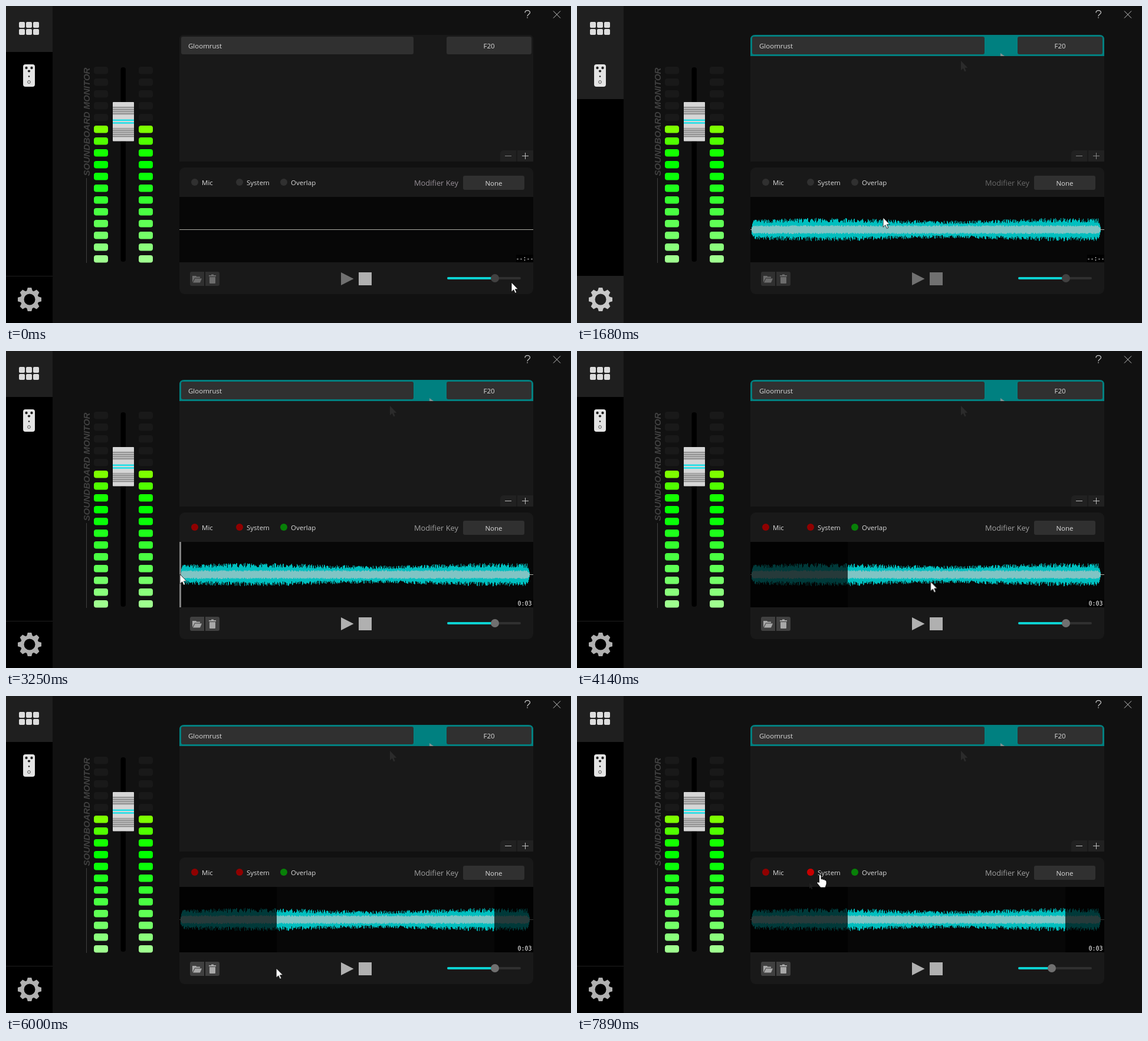
These frames come from a looping animation (958x538 px, 8 s). An HTML page:

```html
<!DOCTYPE html>
<html lang="en">
<head>
<meta charset="utf-8">
<title>Soundboard</title>
<style>
html, body { margin: 0; width: 100%; height: 100%; overflow: hidden; background: #111; }
svg { display: block; width: 958px; height: 538px; animation: state 8s step-end infinite; }
text { font: 11.5px "Open Sans", "Noto Sans", sans-serif; fill: #dcdcdc; }
.mid { text-anchor: middle; }
.vertical { font: italic bold 15px "Liberation Sans", Arial, sans-serif; fill: #404040; }
.time { font: 10px "DejaVu Sans Mono", monospace; fill: #fff; }
.panel { fill: #191919; }
.field { fill: #303030; }
.line { fill: none; stroke-width: 1; }

/* Three states of the window: nothing selected, busy, clip loaded */
@keyframes state {
  0% {
    --top: #1f1f1f; --side: #000; --gear: #b0b0b0; --row: #191919; --plus: #c0c0c0; --minus: #858585;
    --key: #978f97; --btn: #303030; --icon: #6c6c6c; --play: #707070; --stop: #b0b0b0;
    --knob: #414141; --rec: #303030; --sys: #303030; --mix: #303030;
  }
  8.5% {
    --top: #202020; --side: #202020; --gear: #c8c8c8; --row: #008080; --plus: #858585; --minus: #858585;
    --key: #686868; --btn: #303030; --icon: #6c6c6c; --play: #707070; --stop: #707070;
    --knob: #414141; --rec: #303030; --sys: #303030; --mix: #303030;
  }
  21.375%, 100% {
    --top: #1f1f1f; --side: #000; --gear: #b0b0b0; --row: #008080; --plus: #c0c0c0; --minus: #c0c0c0;
    --key: #a0a0a0; --btn: #404040; --icon: #a8a8a8; --play: #b0b0b0; --stop: #b0b0b0;
    --knob: #707070; --rec: #900000; --sys: #900000; --mix: #088008;
  }
}

#cursor { animation: move 8s linear infinite; }
@keyframes move {
  0%, .375% { transform: translate(857px, 469px); }
  2.5% { transform: translate(760px, 378px); }
  5.25% { transform: translate(651px, 93px); }
  7.25% { transform: translate(732px, 50px); }
  9.75%, 11% { transform: translate(714px, 72px); }
  11.75% { transform: translate(705px, 105px); }
  15% { transform: translate(640px, 225px); }
  18.5% { transform: translate(545px, 340px); }
  21% { transform: translate(519px, 359px); }
  23%, 24.75% { transform: translate(523px, 362px); }
  27.5% { transform: translate(470px, 435px); }
  30.5% { transform: translate(350px, 451px); }
  33% { transform: translate(281px, 400px); }
  34.375%, 35.25% { transform: translate(291px, 382px); }
  37.75%, 40.25% { transform: translate(297px, 380px); }
  40.625%, 43.125% { transform: translate(295px, 379px); }
  46.125%, 48.625% { transform: translate(460px, 384px); }
  52% { transform: translate(610px, 392px); }
  56% { transform: translate(860px, 390px); }
  57.875%, 58.75% { transform: translate(892px, 386px); }
  61% { transform: translate(828px, 390px); }
  64% { transform: translate(719px, 444px); }
  66.25% { transform: translate(630px, 519px); }
  68.625%, 70% { transform: translate(468px, 488px); }
  73% { transform: translate(588px, 466px); }
  77% { transform: translate(330px, 458px); }
  79.875%, 80.25% { transform: translate(418px, 462px); }
  83.5% { transform: translate(740px, 461px); }
  85.25%, 86.125% { transform: translate(816px, 462px); }
  88% { transform: translate(880px, 463px); }
  90%, 90.375% { transform: translate(808px, 463px); }
  91.5% { transform: translate(760px, 471px); }
  94.5% { transform: translate(272px, 345px); }
  96.75% { transform: translate(394px, 316px); }
  98.625%, 100% { transform: translate(412px, 303px); }
}

.step { opacity: 0; animation: 8s step-end infinite; }
#wave { animation-name: wave; }
#trail { animation-name: trail; }
#lastTrail { animation-name: lastTrail; }
#hand, #sysHover { animation-name: hover; }
#arrow { animation-name: arrow; opacity: 1; }
#empty { animation-name: empty; }
#length { animation-name: ready; }
@keyframes wave { 0% { opacity: 0 } 18.75%, 100% { opacity: 1 } }
@keyframes trail { 0% { opacity: 0 } 8.5%, 100% { opacity: 1 } }
@keyframes lastTrail { 0% { opacity: 0 } 97%, 100% { opacity: 1 } }
@keyframes hover { 0% { opacity: 0 } 97.25%, 100% { opacity: 1 } }
@keyframes arrow { 0% { opacity: 1 } 97.25%, 100% { opacity: 0 } }
@keyframes empty { 0% { opacity: 1 } 21.375%, 100% { opacity: 0 } }
@keyframes ready { 0% { opacity: 0 } 21.375%, 100% { opacity: 1 } }

/* Trim handles and the shade outside the trimmed part */
.handle { fill: #808080; opacity: 0; }
#leftHandle { animation: leftShow 8s step-end infinite, leftMove 8s linear infinite; }
#rightHandle { animation: rightShow 8s step-end infinite, rightMove 8s linear infinite; }
#leftShade { animation: leftTrim 8s linear infinite; }
#rightShade { animation: rightTrim 8s linear infinite; transform-origin: 894px 0; }
@keyframes leftShow { 0% { opacity: 0 } 36% { opacity: 1 } 48.75%, 100% { opacity: 0 } }
@keyframes rightShow { 0% { opacity: 0 } 57% { opacity: 1 } 61.5%, 100% { opacity: 0 } }
@keyframes leftMove { 0%, 43.125% { transform: none } 46.125%, 100% { transform: translateX(163px) } }
@keyframes rightMove { 0%, 58.75% { transform: none } 61%, 100% { transform: translateX(-65px) } }
@keyframes leftTrim { 0%, 43.125% { width: 0 } 46.125%, 100% { width: 165px } }
@keyframes rightTrim { 0%, 58.75% { transform: scaleX(0) } 61%, 100% { transform: scaleX(1) } }

#level { animation: level 8s linear infinite; }
#knob { animation: knob 8s linear infinite; }
@keyframes level { 0%, 86.125% { width: 81px } 88% { width: 118px } 90%, 100% { width: 57px } }
@keyframes knob { 0%, 86.125% { transform: none } 88% { transform: translateX(37px) } 90%, 100% { transform: translateX(-24px) } }
</style>
</head>
<body>
<svg viewBox="0 0 958 538">
  <defs>
    <pattern id="ridges" width="36" height="3.5" patternUnits="userSpaceOnUse">
      <rect width="36" height="3.5" fill="#c4c4c4"/><rect width="36" height="1.6" fill="#858585"/>
    </pattern>
    <path id="pointer" d="M0 0V16.2L3.8 12.7L6.2 18.3L8.8 17.2L6.4 11.7H11.3Z"/>
  </defs>
  <rect width="958" height="538" fill="#111"/>

  <g id="sidebar">
    <rect width="79" height="538"/>
    <rect width="79" height="78" style="fill:var(--top)"/>
    <rect y="78" width="79" height="80" style="fill:var(--side)"/>
    <rect y="458" width="79" height="80" style="fill:var(--side)"/>
    <rect y="458" width="79" height="1" fill="#202020"/>
    <g id="grid" fill="#dcdcdc"></g>
    <rect x="29" y="99" width="20" height="38" rx="4" fill="#e4e4e4"/>
    <g fill="#222">
      <circle cx="34.5" cy="105" r="2.2"/><circle cx="43.5" cy="105" r="2.2"/>
      <circle cx="39" cy="110.5" r="2.1"/><circle cx="39" cy="119.5" r="1.3"/>
    </g>
    <circle cx="39" cy="129" r="2.4" fill="none" stroke="#555"/>
    <g transform="translate(40 498)" style="fill:var(--gear);stroke:var(--gear)">
      <circle r="12.5" fill="none" stroke-width="6"/>
      <g id="teeth" stroke="none"></g>
    </g>
  </g>

  <g id="meter">
    <text class="vertical" transform="translate(142 288.5) rotate(-90)">SOUNDBOARD MONITOR</text>
    <rect x="136" y="292" width="1" height="144" fill="#404040"/>
    <g id="leds"></g>
    <rect x="194.500" y="104" width="8.500" height="330" rx="4"/>
    <rect x="181" y="163" width="36" height="66.500" rx="1" fill="#d6d6d6"/>
    <rect x="181" y="170" width="36" height="15" fill="url(#ridges)"/>
    <rect x="181" y="207" width="36" height="16" fill="url(#ridges)"/>
    <path d="M181 193.700H217M181 198.500H217" stroke="#1ce0e8" stroke-width="2.600"/>
  </g>

  <g class="line" stroke="#c8c8c8">
    <path d="M928 8.500L940 20.500M940 8.500L928 20.500"/>
    <path stroke-width="1.300" d="M880 11.500C880 6.500 888.500 6.500 888.500 11C888.500 14 884 14 884 17.500M884 19V20.500"/>
  </g>

  <g id="clips">
    <path class="panel" d="M294 264V57Q294 49 302 49H886Q894 49 894 57V264Z"/>
    <path style="fill:var(--row)" d="M294 85V57Q294 49 302 49H886Q894 49 894 57V85Z"/>
    <rect class="field" x="297" y="52" width="394" height="30" rx="3"/>
    <rect class="field" x="747" y="52" width="144" height="30" rx="3"/>
    <text x="309" y="72">Gloomrust</text>
    <text class="mid" x="819" y="72">F20</text>
    <path fill="#212121" d="M838 264V251Q838 245 844 245H865V264ZM867 245H894V264H867Z"/>
    <path class="line" style="stroke:var(--minus)" d="M846 254.500H857"/>
    <path class="line" style="stroke:var(--plus)" d="M875 254.500H886M880.500 249V260"/>
    <g id="trail" class="step">
      <use href="#pointer" x="651" y="93" fill="#2b2b2b"/>
      <path d="M718 80L725 85H718Z" fill="#829494"/>
    </g>
  </g>

  <g id="editor">
    <rect class="panel" x="294" y="274" width="600" height="215" rx="9"/>
    <circle cx="320" cy="299" r="6" style="fill:var(--rec)"/>
    <circle cx="396" cy="299" r="6" style="fill:var(--sys)"/>
    <circle id="sysHover" class="step" cx="396" cy="299" r="6" fill="#c80000"/>
    <circle cx="471" cy="299" r="6" style="fill:var(--mix)"/>
    <text x="332" y="304">Mic</text>
    <text x="408" y="304">System</text>
    <text x="483" y="304">Overlap</text>
    <text x="692" y="305" style="font-size:12.8px;fill:var(--key)">Modifier Key</text>
    <rect class="field" x="775" y="288" width="104" height="24" rx="3"/>
    <text class="mid" x="827" y="305">None</text>

    <rect x="294" y="324" width="600" height="111" fill="#070707"/>
    <rect x="294" y="379" width="600" height="1" fill="#acaca4"/>
    <g id="wave" class="step line">
      <path id="peaks" stroke="#00bfbf"/>
      <path id="body" stroke="#80c4c4"/>
    </g>
    <rect id="leftShade" x="294" y="324" width="165" height="111" fill-opacity=".7"/>
    <rect id="rightShade" x="828" y="324" width="66" height="111" fill-opacity=".7"/>
    <rect id="leftHandle" class="handle" x="294" y="324" width="3" height="111"/>
    <rect id="rightHandle" class="handle" x="891" y="324" width="3" height="111"/>
    <rect x="865" y="422" width="29" height="13"/>
    <text id="empty" class="step time" x="864.500" y="432">--:--</text>
    <text id="length" class="step time" x="867.500" y="432">0:03</text>
    <use id="lastTrail" class="step" href="#pointer" fill="#202020" transform="translate(394 317) scale(.6)"/>

    <g style="fill:var(--btn)">
      <path d="M336 451H315Q312 451 312 454V472Q312 475 315 475H336ZM338 451H359Q362 451 362 454V472Q362 475 359 475H338Z"/>
    </g>
    <g style="fill:var(--icon)">
      <path d="M316 469V458H322L323.500 459.500H329V461.500H320ZM320.500 462.500H332L329 469.500H317Z"/>
      <path d="M344 457H348V455.500H352V457H356V459H344ZM345 460H355V470Q355 471 354 471H346Q345 471 345 470Z"/>
    </g>
    <path d="M568 452L589.500 463L568 474Z" style="fill:var(--play)"/>
    <rect x="598" y="452" width="22" height="22" style="fill:var(--stop)"/>
    <rect x="748" y="460" width="125" height="4" rx="2" fill="#303030"/>
    <rect id="level" x="748" y="460" width="81" height="4" rx="2" fill="#0cd2d2"/>
    <circle id="knob" cx="829" cy="462" r="7" style="fill:var(--knob)"/>
  </g>

  <g id="cursor" fill="#fff" stroke="#000" stroke-width=".8">
    <use id="arrow" class="step" href="#pointer"/>
    <path id="hand" class="step" d="M-1.500 1.500Q0 -1 2 1.500V8Q4 6.500 5 8.500Q7 7.500 8 9.500Q11 9 11 12V16L9 22H1L-5 14.500Q-5 11.500 -1.500 13.500Z"/>
  </g>
</svg>
<script>
const $ = id => document.getElementById(id);
const rect = (x, y, w, h, rx, fill) =>
  `<rect x="${x}" y="${y}" width="${w}" height="${h}" rx="${rx}"${fill ? ` fill="${fill}"` : ''}/>`;
const repeat = (n, fn) => Array.from({ length: n }, (_, i) => fn(i)).join('');

$('grid').innerHTML = repeat(6, i => rect(22 + i % 3 * 12, 27 + Math.floor(i / 3) * 12, 10, 10, 2));
$('teeth').innerHTML = repeat(8, i => `<path d="M-5 -14L-3.2 -20H3.2L5 -14Z" transform="rotate(${i * 45})"/>`);

function ledColor(i) {
  if (i < 5) return '#191919';
  if (i < 8) return `rgb(${[125, 80, 20][i - 5]},255,0)`;
  const pale = Math.max(0, (i - 8.6) * 21.5);
  return `rgb(${pale},255,${pale * .9})`;
}
$('leds').innerHTML = repeat(17, i =>
  [149, 225].map(x => rect(x, 103 + i * 20, 24, 12.5, 4, ledColor(i))).join(''));

let seed = 7;
const random = () => (seed = seed * 16807 % 2147483647) / 2147483647;
let peaks = '', body = '';
for (let x = 296; x < 888; x++) {
  const fade = Math.min(1, (x - 293) / 6, (889 - x) / 6);
  const reach = (17 + 2.2 * Math.cos((x - 420) / 65)) * fade;
  const bar = (up, down) => `M${x + .5} ${(379.5 - up).toFixed(1)}V${(379.5 + down).toFixed(1)}`;
  const size = () => reach * (.62 + .42 * random());
  const core = () => fade * (5.2 + 2.4 * random());
  peaks += bar(size(), size());
  body += bar(core(), core());
}
$('peaks').setAttribute('d', peaks);
$('body').setAttribute('d', body);
</script>
</body>
</html>
```
